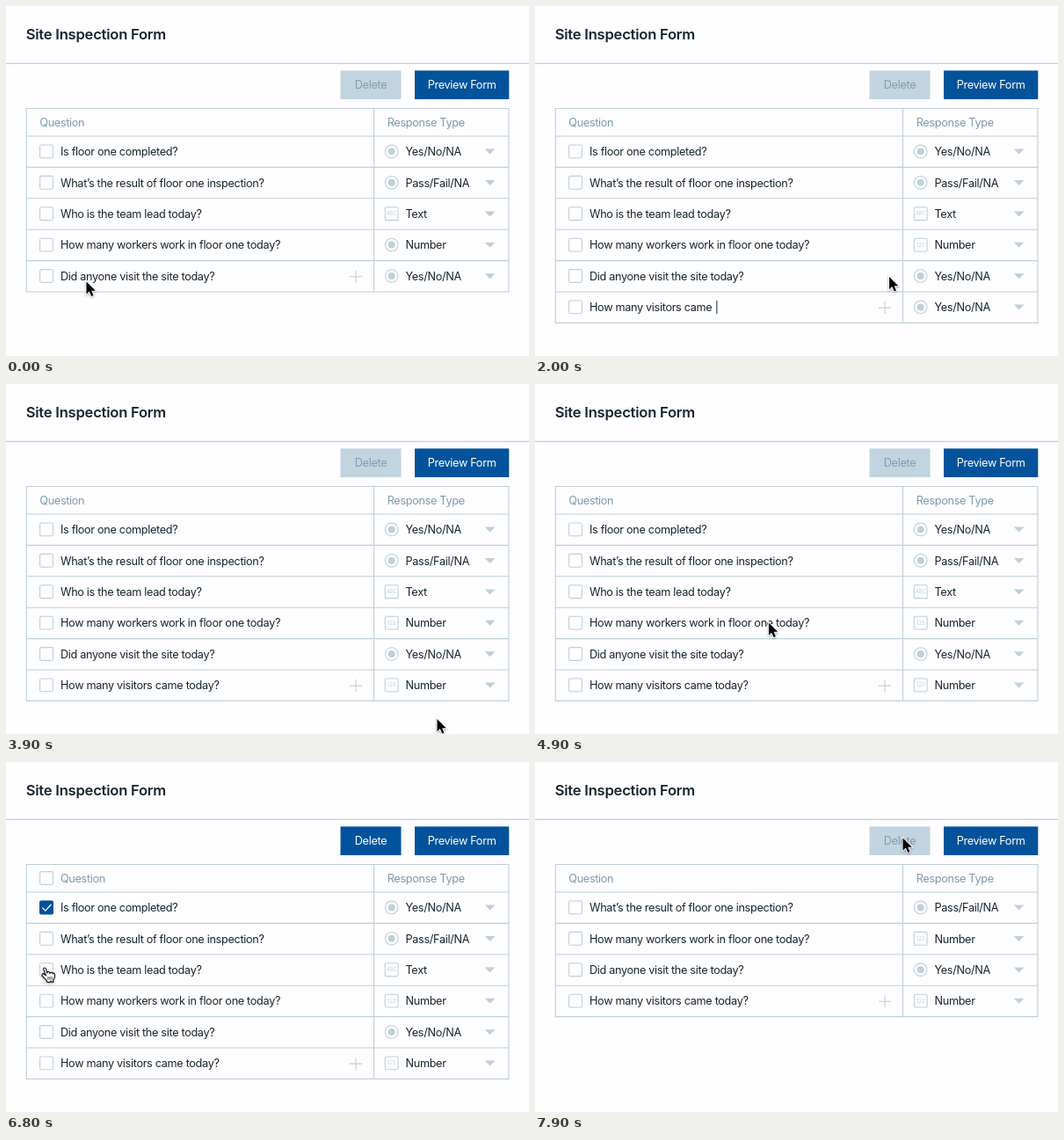
Animation, 595 px wide and 398 px high, one loop 8000 ms. Source, as an HTML page:

```html
<!DOCTYPE html>
<html lang="en">
<head>
<meta charset="utf-8">
<title>Site Inspection Form</title>
<style>
  html, body { margin: 0; width: 100%; height: 100%; overflow: hidden; background: #fefdff; }
  svg { display: block; width: 595px; height: 398px; }
  text { font: 12.7px Inter, "Liberation Sans", sans-serif; letter-spacing: -.33px; fill: #17252f; white-space: pre; }
  .title { font-size: 16.6px; font-weight: 600; letter-spacing: -.24px; }
  .head { fill: #7e9aad; }
  .mid { text-anchor: middle; }
  .white { fill: #fff; }
  .faded { fill: #7f9db2; }
  .tiny { font-size: 5.6px; letter-spacing: 0; fill: #b9cdd9; text-anchor: middle; }
  .line { fill: none; stroke: #bfd0da; stroke-width: 1.1; }
  .soft { fill: #bfd0da; }
</style>
</head>
<body>
<svg id="stage" viewBox="0 0 595 398"></svg>
<script>
const LOOP = 8000, ROW = 35.4, TOP = 148, BLUE = '#02539b';
const LEFT = 23.3, SPLIT = 418.5, RIGHT = 572;
const NEW_QUESTION = 'How many visitors came today?';

// Times of the state changes, in ms
const ADD = 850, OPEN = 2700, CLOSE = 3500, CHECK_1 = 5950, CHECK_3 = 6850, REMOVE = 7650;

// Cursor: time, x, y
const CURSOR = [
  [0, 91.5, 313.5], [100, 91.5, 313.5], [700, 403, 308], [2300, 403, 308],
  [2650, 489, 343], [2950, 489, 343], [3300, 490.5, 381], [4200, 490.5, 381],
  [5600, 43.2, 163], [6050, 43.2, 163], [6500, 43.6, 234], [6950, 43.6, 234],
  [7500, 418.5, 86.5], [LOOP, 418.5, 86.5]
];
// Typing: time, characters
const TYPING = [[0, 0], [1220, 0], [1600, 18], [1850, 18], [2000, 23], [2150, 23], [2350, 29], [LOOP, 29]];

const linear = u => u;
const ease = u => u < .5 ? 4 * u ** 3 : 1 - (2 - 2 * u) ** 3 / 2;

function track(keys, t, curve) {
  const i = Math.max(1, keys.findIndex(k => k[0] > t));
  const [a, b] = [keys[i - 1], keys[i]];
  const u = curve((t - a[0]) / (b[0] - a[0]));
  return a.slice(1).map((v, n) => v + (b[n + 1] - v) * u);
}

const text = (x, y, str, cls = '') => `<text x="${x}" y="${y}" class="${cls}">${str}</text>`;
const path = (d, cls = 'line') => `<path d="${d}" class="${cls}"/>`;

function button(x, w, label, enabled) {
  return `<rect x="${x}" y="73.4" width="${w}" height="32.6" fill="${enabled ? BLUE : '#c2d4df'}"/>` +
    text(x + w / 2, 94.4, label, enabled ? 'mid white' : 'mid faded');
}

function checkbox(y, checked) {
  return checked
    ? `<rect x="38" y="${y - 8}" width="16" height="16" rx="2" fill="${BLUE}"/>
       <path d="M41.4 ${y + .3}l3.4 3.5 6.6-7.2" fill="none" stroke="#fff" stroke-width="1.2"/>`
    : `<rect x="38.6" y="${y - 7.4}" width="14.8" height="14.8" rx="1.6" class="line"/>`;
}

function icon(y, kind) {
  if (kind === 'radio') return `<circle cx="438.7" cy="${y}" r="7.3" class="line"/><circle cx="438.7" cy="${y}" r="4" class="soft"/>`;
  return `<rect x="431.3" y="${y - 7.4}" width="14.8" height="14.8" rx="1.2" class="line"/>` +
    text(438.7, y + 2, kind, 'tiny');
}

const response = (y, kind, label) => icon(y, kind) + text(454.5, y + 4.7, label);

function row(y, r) {
  return checkbox(y, r.checked) + text(62, y + 4.7, r.question) +
    (r.kind ? response(y, r.kind, r.label) : text(430.7, y + 4.7, r.label)) +
    path(`M544.8 ${y - 2.8}h11.6l-5.8 6z`, 'soft');
}

function rowsAt(t) {
  const make = (question, kind, label, checked = false) => ({ question, kind, label, checked });
  const rows = [
    make('Is floor one completed?', 'radio', 'Yes/No/NA', t >= CHECK_1),
    make('What’s the result of floor one inspection?', 'radio', 'Pass/Fail/NA'),
    make('Who is the team lead today?', 'ABC', 'Text', t >= CHECK_3),
    make('How many workers work in floor one today?', t < ADD ? 'radio' : '123', 'Number'),
    make('Did anyone visit the site today?', 'radio', 'Yes/No/NA')
  ];
  if (t >= ADD) {
    const typed = NEW_QUESTION.slice(0, Math.round(track(TYPING, t, linear)[0]));
    const question = typed + (t < OPEN ? '|' : '');
    rows.push(t < OPEN ? make(question, 'radio', 'Yes/No/NA')
      : t < CLOSE ? make(question, '', 'Select Response')
      : make(question, '123', 'Number'));
  }
  return t < REMOVE ? rows : rows.filter(r => !r.checked);
}

const HAND = `<path d="M1 6.8L-.9 1.6Q-1 0 .3 0 1.6 0 2 1.8L3.2 6.2Q3 4.6 4.6 4.5 6.2 4.6 6.3 6.6 6.4 5 7.9 5 9.3 5.2 9.5 7
    10 5.8 11 6 11.8 6.3 11.8 8V10Q11.6 12 10.5 13.2 9.8 14.3 10.1 16.4L8.7 16.3 7.7 15 6.5 16.4 3 16.3Q3.2 14.8 2 13.6
    L0 11.8-2.6 8.6Q-3 6.9-1.3 6.5L1.8 8.8z" fill="#fff" stroke="#111" stroke-width="1.1" stroke-linejoin="round"/>
  <path d="M4.3 10v3.6M6.4 10v3.6M8.5 10v3.6" stroke="#111" stroke-width=".8"/>`;
const ARROW = `<path d="M0 0V14.2L3.3 11.1 5.7 16.4 8 15.4 5.7 10.2H10.3Z"
    fill="#000" stroke="#fff" stroke-width="1.8" paint-order="stroke"/>`;

function pointer(t) {
  const [x, y] = track(CURSOR, t, ease);
  const onBox = x > 38 && x < 54 && y > 150 && (y - 156) % ROW < 18;
  const onPlus = t < ADD && Math.abs(x - 398) < 9;
  const onDelete = t > CHECK_3 && t < REMOVE && x > 380 && y < 106;
  return `<g transform="translate(${x.toFixed(2)} ${y.toFixed(2)})" style="filter:drop-shadow(0 1px 1px #0005)">` +
    (onBox || onPlus || onDelete ? HAND : ARROW) + '</g>';
}

function scene(t) {
  const rows = rowsAt(t), anyChecked = rows.some(r => r.checked);
  const bottom = TOP + rows.length * ROW;
  const center = i => TOP + (i + .5) * ROW - .3;
  const plusY = center(rows.length - 1) + .7;
  let out = text(22.7, 38.2, 'Site Inspection Form', 'title') +
    path('M0 65.4H595') +
    button(380.5, 69, 'Delete', anyChecked) + button(465, 107.3, 'Preview Form', true) +
    path(`M${LEFT} 116.5H${RIGHT}V${bottom}H${LEFT}zM${SPLIT} 116.5V${bottom}`) +
    (anyChecked ? checkbox(132, false) : '') +
    text(anyChecked ? 62 : 38.3, 136.7, 'Question', 'head') +
    text(433.7, 136.7, 'Response Type', 'head');
  rows.forEach((r, i) => {
    out += path(`M${LEFT} ${TOP + i * ROW}H${RIGHT}`) + row(center(i), r);
  });
  out += path(`M391 ${plusY}h14m-7-7v14`);
  if (t >= OPEN && t < CLOSE) {
    out += path(`M${SPLIT} ${bottom}V400M${RIGHT} ${bottom}V400M${SPLIT} ${bottom + ROW}H${RIGHT}`) +
      response(center(rows.length), '123', 'Number');
  }
  return out + pointer(t);
}

const stage = document.getElementById('stage');
const start = performance.now();
let last = '';
function draw() {
  const next = scene((performance.now() - start) % LOOP);
  if (next !== last) stage.innerHTML = last = next;
  requestAnimationFrame(draw);
}
draw();
</script>
</body>
</html>
```
